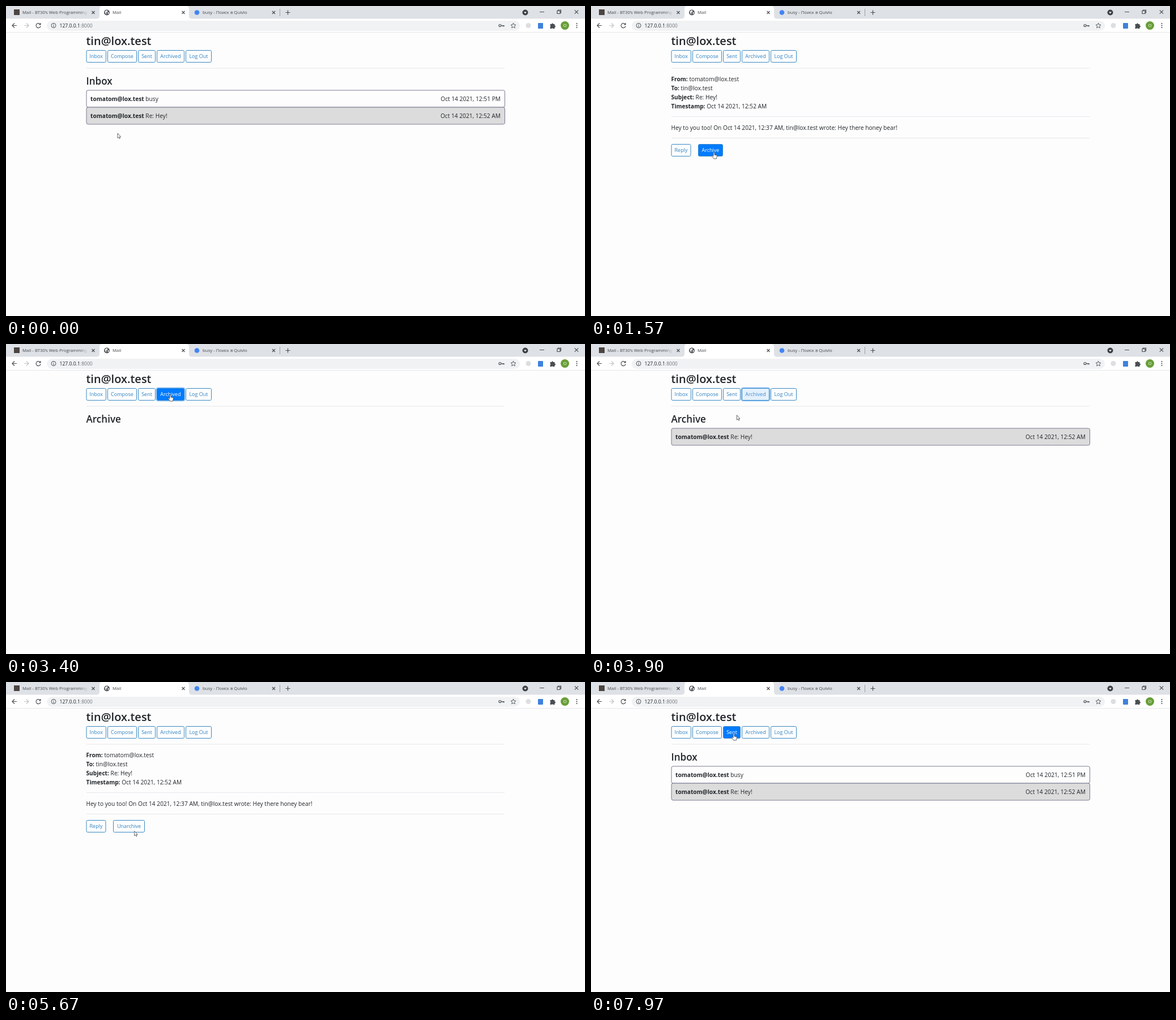
An HTML page for the animation above (8 s loop, 1022x548 px).

```html
<!DOCTYPE html>
<html lang="en">
<head>
<meta charset="utf-8">
<title>Mail</title>
<style>
html, body { margin: 0; height: 100%; overflow: hidden; background: #fdfdfd; }
svg { display: block; font: 10.2px "Open Sans", sans-serif; fill: #212529; }
text { white-space: pre; }
.tab { font-size: 7.8px; fill: #45494d; }
.url { font-size: 8.6px; }
h2, .h2 { font-size: 20px; font-weight: 600; }
.h3 { font-size: 17.1px; font-weight: 600; }
.b { font-weight: 700; }
.line { fill: none; stroke: #4a4e52; stroke-width: 1.2; }
.rule { stroke: #e6e6ee; }
.row { stroke: #797c92; }
.btn { --hover: 0; font-size: 9px; text-anchor: middle; }
.btn rect { fill: #007bff; fill-opacity: var(--hover); stroke: #3989c2; }
.btn text { fill: color-mix(in srgb, #fff calc(var(--hover) * 100%), #2f82c4); }
.btn .ring { fill: none; stroke: #007bff; stroke-opacity: .5; stroke-width: 1.6; display: none; }
.btn.focus .ring { display: inline; }
.cursor { fill: #fff; stroke: #54565c; stroke-width: .9; stroke-linejoin: round; }
</style>
</head>
<body>
<svg id="stage" width="1022" height="548" viewBox="0 0 1022 548"></svg>
<script>
const LOOP = 8000;
const ME = 'tin@lox.test', FRIEND = 'tomatom@lox.test';

const text = (x, y, content, cls = '', attrs = '') =>
  `<text x="${x}" y="${y}" class="${cls}" ${attrs}>${content}</text>`;
const line = (d, attrs = '') => `<path class="line" d="${d}" ${attrs}/>`;
const rule = y => `<path class="rule" d="M142 ${y}H880"/>`;
const close = (x, y, r = 2.5) => line(`M${x - r} ${y - r}l${2 * r} ${2 * r}m0 ${-2 * r}l${-2 * r} ${2 * r}`);
const group = (id, content) => `<g id="${id}">${content}</g>`;

const button = (id, x, y, w, label) => `<g id="${id}" class="btn">
  <rect class="ring" x="${x - 1}" y="${y - 1}" width="${w + 2}" height="23" rx="3"/>
  <rect x="${x}" y="${y}" width="${w}" height="21" rx="2.2"/>
  ${text(x + w / 2, y + 13.7, label)}</g>`;

const row = (y, subject, time, fill) =>
  `<rect class="row" x="142" y="${y}" width="738.5" height="30" rx="3" fill="${fill}"/>
  <text x="149" y="${y + 19}"><tspan class="b">${FRIEND}</tspan> ${subject}</text>
  ${text(873, y + 19, time, '', 'text-anchor="end"')}`;

const busyRow = row(149, 'busy', 'Oct 14 2021, 12:51 PM', '#fdfdfd');
const heyRow = y => row(y, 'Re: Hey!', 'Oct 14 2021, 12:52 AM', '#dcdcdc');
const title = label => text(141.5, 139, label, 'h3');

const fields = [['From', FRIEND], ['To', ME], ['Subject', 'Re: Hey!'], ['Timestamp', 'Oct 14 2021, 12:52 AM']]
  .map(([name, value], i) => text(141.5, 133 + 16 * i, `<tspan class="b">${name}:</tspan> ${value}`)).join('');

const chrome = `
  <defs><linearGradient id="fade"><stop stop-color="#dee1e6" stop-opacity="0"/><stop offset="1" stop-color="#dee1e6"/></linearGradient></defs>
  <rect width="1022" height="23" fill="#dee1e6"/>
  <path fill="#fff" d="M0 22.5H160q5 0 5-5V5q0-5 5-5H318q5 0 5 5v12.5q0 5 5 5H1022V46H0z"/>
  <path d="M0 46.5H1022" stroke="#e4e6e9"/>
  <rect x="72" y="26" width="835" height="18" rx="9" fill="#f0f2f4"/>
  <rect x="14" y="6" width="10" height="10" fill="#4c4541"/>
  ${text(29, 14, 'Mail - BT30’s Web Programming', 'tab')}
  <rect x="131" y="3" width="13" height="16" fill="url(#fade)"/>
  <rect x="144" y="3" width="5" height="16" fill="#dee1e6"/>
  <circle cx="178" cy="11.5" r="5" fill="#55595e"/>
  <path fill="#fff" d="M174.500 10l3-2.500 2 1-1 2.500-2 .5 1 3-1.500-.5zM180 11l2 .5-1 2.500-1.500-.5z"/>
  ${text(188, 14, 'Mail', 'tab')}
  <circle cx="337" cy="11.500" r="4.300" fill="#4285f4"/>
  ${text(347, 14, 'busy - Поиск в Quivlo', 'tab')}
  ${close(154, 11.5)}${close(313, 11.5)}${close(472.5, 11.5)}
  <path d="M483.500 5v13" stroke="#9a9da2"/>
  ${line('M493.500 11.500h8m-4-4v8')}
  <circle cx="916.500" cy="11.500" r="5" fill="#3c4043"/><path fill="#fff" d="M914 10.500h5l-2.500 3z"/>
  ${line('M942 10.500h8M973 8.500h5v5h-5zM974.500 8.500v-1.500h5v5h-1.500', 'stroke-width="1"')}
  ${close(1007, 10.5, 3.2)}
  ${line('M19 34.500h-8m4-4l-4 4 4 4')}
  ${line('M32 34.500h8m-4-4l4 4-4 4', 'style="stroke:#c0c3c7"')}
  ${line('M60.500 32.500a4 4 0 1 0 .5 3M61 30v3h-3')}
  <circle class="line" cx="84" cy="34.500" r="4" style="stroke-width:1"/>
  ${line('M84 34v3m0-5v1', 'style="stroke-width:1"')}
  ${text(94.5, 37.7, '127.0.0.1<tspan fill="#74787d">:8000</tspan>', 'url')}
  <circle class="line" cx="872" cy="34.500" r="2"/>${line('M874 34.500h5v2m-2-2v2')}
  ${line('M895.500 30l1.300 3 3.200.3-2.400 2.200.7 3.300-2.800-1.700-2.800 1.700.7-3.300-2.400-2.200 3.200-.3z', 'style="stroke-width:.9"')}
  <circle cx="922" cy="34.500" r="4.500" fill="#dcdfe1"/>
  <rect x="939" y="30" width="9" height="10" rx="1" fill="#3f82dc"/>
  <path fill="#4a4e52" d="M960.500 32h2.500a1.500 1.500 0 0 1 3 0h2.500v2.500a1.500 1.500 0 0 1 0 3v2.500h-3a1.500 1.500 0 0 0-2.500 0h-2.500v-3a1.500 1.500 0 0 0 0-2.500z"/>
  <circle cx="986.500" cy="34.500" r="7.500" fill="#689f38"/>
  ${text(986.5, 37.4, 'O', '', 'text-anchor="middle" style="font-size:8px;fill:#fff"')}
  ${[31, 34.5, 38].map(y => `<circle cx="1007.500" cy="${y}" r="1.100" fill="#4a4e52"/>`).join('')}`;

const page = text(141.5, 68.5, ME, 'h2')
  + button('inbox', 142, 78.5, 34.5, 'Inbox')
  + button('compose', 179.5, 78.5, 51, 'Compose')
  + button('sent', 233.5, 78.5, 30, 'Sent')
  + button('archived', 266.5, 78.5, 48, 'Archived')
  + button('logout', 317.5, 78.5, 45, 'Log Out')
  + rule(110)
  + group('inboxView', title('Inbox') + busyRow)
  + group('inboxHey', heyRow(179))
  + group('archiveView', title('Archive'))
  + group('archiveHey', heyRow(149))
  + group('mailView', fields + rule(195.5)
    + text(141.5, 219, `Hey to you too! On Oct 14 2021, 12:37 AM, ${ME} wrote: Hey there honey bear!`)
    + rule(233.5) + button('reply', 142, 244.5, 34, 'Reply'))
  + button('archive', 189.5, 244.5, 43, 'Archive')
  + button('unarchive', 189.5, 244.5, 55, 'Unarchive');

const cursor = `<g id="cursor" class="cursor">
  <path id="arrow" d="M0 0V8.500L1.900 6.800 3.300 9.500 4.500 8.900 3.300 6.200H5.600z"/>
  <path id="hand" d="M-1 1q1-1.800 2 0v4l3.300.8q1.400.5 1 2l-.9 4.200h-4.600l-3.300-4.300q0-1.500 1.300-1l1.200 1z"/></g>`;

const $ = id => document.getElementById(id);
$('stage').innerHTML = chrome + page + cursor;

// Time spans [from, to) in ms during which each element is visible
const shown = {
  inboxView: [[0, 480], [1750, 3250], [6300, LOOP]],
  inboxHey: [[0, 480], [6300, LOOP]],
  archiveView: [[3250, 4800]],
  archiveHey: [[3450, 4800]],
  mailView: [[480, 1750], [4800, 6300]],
  archive: [[480, 1750]],
  unarchive: [[4800, 6300]],
  hand: [[110, 560], [850, 2255], [2480, 2630], [2950, 3780], [4080, 4900], [5690, 6690], [7650, 7715], [7800, LOOP]]
};
const hovered = { archive: [870, 1750], archived: [3000, 3780], unarchive: [5700, 6300], sent: [7790, LOOP] };
const focused = [3200, 4780];

// Pointer stops: time, x, y
const stops = [
  [0, 197, 225], [250, 205, 195], [500, 206, 195], [800, 231, 235], [930, 230, 248],
  [1250, 217, 258], [2230, 217, 258], [2470, 245, 185], [2700, 275, 140], [3020, 290, 92],
  [3150, 290, 89], [3600, 290, 89], [4200, 225, 162], [4500, 219, 166], [4880, 219, 166],
  [5500, 232, 281], [5750, 225, 258], [6690, 225, 258], [6690, 555, 467], [6950, 555, 467],
  [7500, 340, 302], [7820, 254, 97], [7950, 252, 91], [LOOP, 252, 91]
];

const clamp = v => Math.min(1, Math.max(0, v));
const smooth = v => v * v * (3 - 2 * v);
const within = (t, [from, to]) => t >= from && t < to;

function pointerAt(t) {
  const next = stops.findIndex(stop => stop[0] > t);
  const [t0, x0, y0] = stops[next - 1], [t1, x1, y1] = stops[next];
  const k = smooth((t - t0) / (t1 - t0));
  return [x0 + (x1 - x0) * k, y0 + (y1 - y0) * k];
}

function draw() {
  const t = performance.now() % LOOP;
  for (const id in shown) $(id).style.display = shown[id].some(span => within(t, span)) ? '' : 'none';
  for (const id in hovered) {
    const [from, to] = hovered[id];
    $(id).style.setProperty('--hover', smooth(clamp((t - from) / 150)) * (1 - smooth(clamp((t - to) / 150))));
  }
  $('archived').classList.toggle('focus', within(t, focused));
  $('arrow').style.display = $('hand').style.display ? '' : 'none';
  $('cursor').setAttribute('transform', `translate(${pointerAt(t)})`);
  requestAnimationFrame(draw);
}
draw();
</script>
</body>
</html>
```
